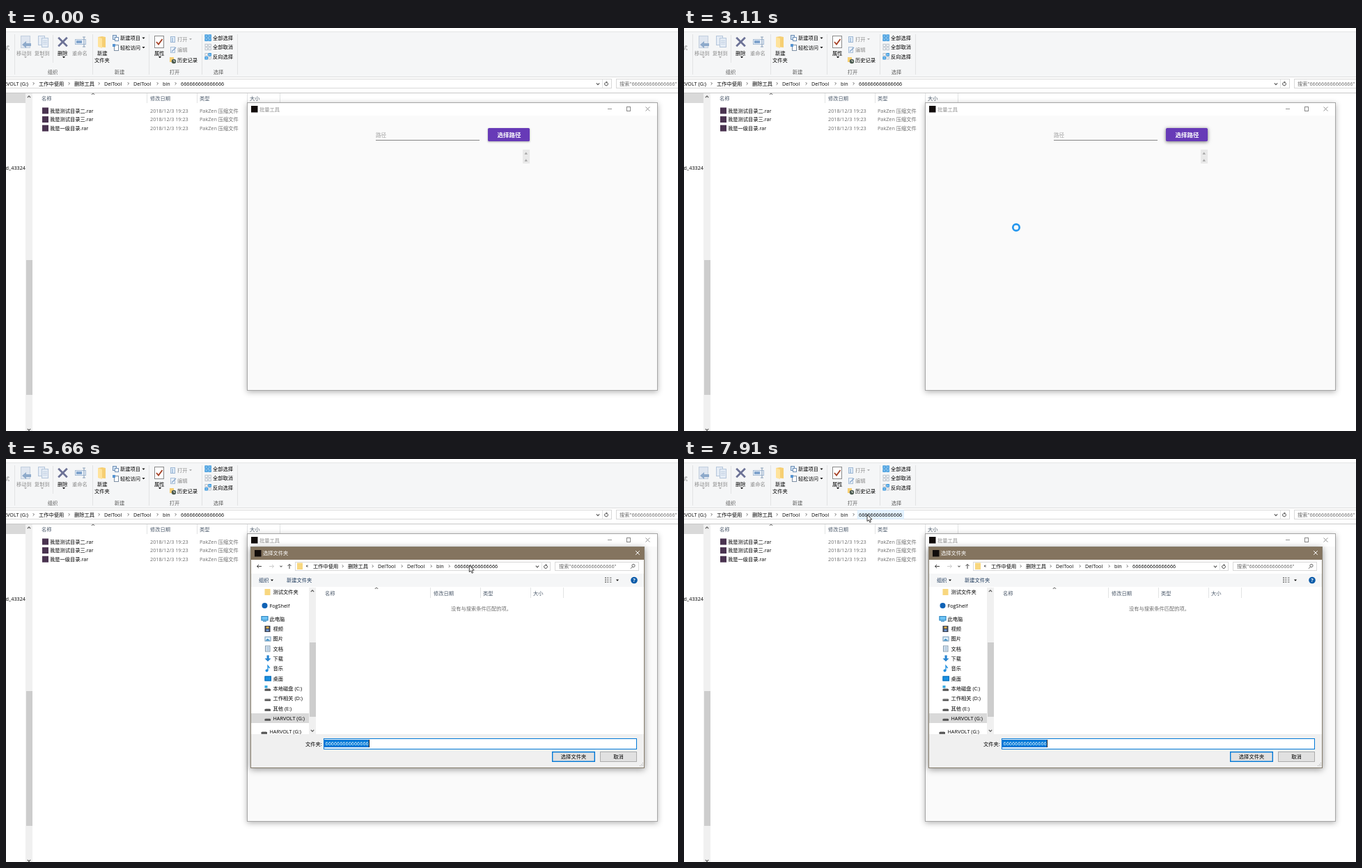
An HTML page with a canvas for the animation above (7.99 s loop, 965x580 px).

```html
<!DOCTYPE html>
<html lang="zh">
<head>
<meta charset="utf-8">
<title>批量工具</title>
<style>
html, body { margin: 0; width: 100%; height: 100%; overflow: hidden; background: #fff }
canvas { display: block }
</style>
</head>
<body>
<canvas id="stage" width="965" height="580"></canvas>
<script>
const c = document.getElementById('stage').getContext('2d');
const LOOP = 7990;
const FONT = '"Open Sans", "Noto Sans CJK SC", "Noto Sans CJK", sans-serif';
const DIGITS = '6'.repeat(15);
const DRIVE = 'HARVOLT (G:)';
const HOVER = '#e5f3ff', BLUE = '#0078d7', GRAY = '#8c8c8c', INK = '#000';

// Pointer keys: time, x, y of the tip
const PATH = [
  [70, 859, 546], [150, 770, 520], [300, 545, 463], [375, 545, 463],
  [830, 330, 300], [1230, 120, 152], [1390, 102, 128], [1690, 102, 128],
  [2160, 430, 238], [2480, 741, 165], [2560, 728, 152], [2640, 720, 149],
  [2800, 720, 149], [3110, 477, 287], [3810, 477, 287], [4430, 690, 180],
  [4660, 666, 153], [4815, 666, 153], [5120, 362, 152], [5350, 668, 152],
  [5660, 666, 153], [6100, 350, 150], [6450, 150, 121], [6690, 236, 84],
  [6830, 232, 80], [6930, 232, 80], [7220, 264, 81], [7840, 264, 81],
  [7910, 263, 80]
];

function pointer(t) {
  const i = PATH.findIndex(k => k[0] > t);
  if (i < 0) return PATH[PATH.length - 1].slice(1);
  if (i === 0) return [-50, -50];
  const [a, x, y] = PATH[i - 1], [b, u, v] = PATH[i];
  const p = (t - a) / (b - a);
  return [x + (u - x) * p, y + (v - y) * p];
}

function rect(x, y, w, h, fill, stroke, line = 1) {
  if (fill) { c.fillStyle = fill; c.fillRect(x, y, w, h); }
  if (stroke) {
    c.strokeStyle = stroke;
    c.lineWidth = line;
    c.strokeRect(x + line / 2, y + line / 2, w - line, h - line);
  }
}

function text(s, x, y, color = INK, size = 7.25, align = 'left', weight = '') {
  c.font = `${weight} ${size}px ${FONT}`;
  c.textAlign = align;
  c.fillStyle = color;
  c.fillText(s, x, y + size * 0.37);
}

function line(color, width, ...p) {
  c.strokeStyle = color;
  c.lineWidth = width;
  c.beginPath();
  for (let i = 0; i < p.length; i += 2) c.lineTo(p[i], p[i + 1]);
  c.stroke();
}

function poly(color, ...p) {
  c.fillStyle = color;
  c.beginPath();
  for (let i = 0; i < p.length; i += 2) c.lineTo(p[i], p[i + 1]);
  c.closePath();
  c.fill();
}

function disc(x, y, r, color) {
  c.fillStyle = color;
  c.beginPath();
  c.arc(x, y, r, 0, 7);
  c.fill();
}

const drop = (x, y, color = INK) => poly(color, x - 2, y - 1, x + 2, y - 1, x, y + 1.2);
const chevron = (x, y, up = 1, color = '#555', w = 2.2) =>
  line(color, 1.1, x - w, y + up, x, y - up, x + w, y + up);
const cross = (x, y, r, color, w = 0.9) => {
  line(color, w, x - r, y - r, x + r, y + r);
  line(color, w, x - r, y + r, x + r, y - r);
};
const vline = (x, y, h, color = '#e2e3e4') => rect(x, y, 1, h, color);

// Shadow outside the box only, so a translucent panel stays clean
function shadow(x, y, w, h, blur, dy, color) {
  c.save();
  c.beginPath();
  c.rect(0, 0, 965, 580);
  c.rect(x, y, w, h);
  c.clip('evenodd');
  c.shadowBlur = blur;
  c.shadowOffsetY = dy;
  c.shadowColor = color;
  rect(x, y, w, h, '#fff');
  c.restore();
}

function page(x, y, w, h, fill = '#fff', edge = '#9fb4cc') {
  rect(x, y, w, h, fill, edge);
}

function refresh(x, y) {
  c.strokeStyle = '#444';
  c.lineWidth = 1;
  c.beginPath();
  c.arc(x, y, 2.4, -0.7, 4.2);
  c.stroke();
  poly('#444', x - 0.5, y - 3.7, x + 2.2, y - 2.6, x - 0.3, y - 0.8);
}

// Path segments: x, label; the one under the pointer lights up
function crumbs(items, y, [mx, my]) {
  for (const [x, label] of items) {
    c.font = `7.25px ${FONT}`;
    const w = c.measureText(label).width;
    if (mx > x - 2 && mx < x + w + 2 && my > y - 7 && my < y + 3.8)
      rect(x - 2, y - 6.5, w + 4.5, 13, HOVER, '#d3eafc', 0.6);
    text(label, x, y);
  }
  for (const [x] of items.slice(1)) {
    line('#555', 0.9, x - 8.3, y - 1.8, x - 6.5, y, x - 8.3, y + 1.8);
  }
}

function headers(xs, y) {
  ['名称', '修改日期', '类型', '大小'].forEach((s, i) => text(s, xs[i], y, '#4c5a6b'));
}

function ribbon() {
  rect(0, 5, 965, 65, '#f5f6f7');
  rect(0, 5, 965, 1, '#e3e4e5');
  rect(0, 70, 965, 1, '#dcddde');
  [12, 124, 205, 281, 332].forEach(x => vline(x, 9, 58));
  vline(67, 10, 40);
  [['组织', 67], ['新建', 163], ['打开', 242], ['选择', 305]]
    .forEach(([s, x]) => text(s, x, 63, '#5c5c5c', 7.25, 'center'));

  text('式', -2, 28, GRAY);
  text('移动到', 15, 36, GRAY);
  text('复制到', 41, 36, GRAY);
  text('删除', 74, 36);
  text('重命名', 95, 36, GRAY);
  text('新建', 131, 36);
  text('文件夹', 127, 46);
  text('属性', 213, 36);
  drop(28, 42, '#aaa'); drop(52, 42, '#aaa'); drop(83, 42); drop(221, 42);

  page(21, 11, 14, 18, '#dfe6f0', '#c3cfde');
  poly('#8eaacb', 23, 24, 29, 19, 29, 22, 36, 22, 36, 26, 29, 26, 29, 29);
  page(46, 11, 10, 14, '#e6edf6', '#b5c6db');
  page(51, 14, 10, 14, '#e6edf6', '#b5c6db');
  [18, 20.5, 23].forEach(y => line('#b5c6db', 0.8, 53, y, 59, y));
  cross(81.5, 20, 6.3, '#6c7296', 2.7);
  rect(99, 16, 16, 8, '#e8eff7', '#a7bdd6');
  rect(101, 18, 8, 4, '#7fa3cc');
  line('#8ba0b8', 1, 110, 13, 114, 13); line('#8ba0b8', 1, 112, 13, 112, 27);
  line('#8ba0b8', 1, 110, 27, 114, 27);
  poly('#f6cf73', 132, 13, 138, 12, 143, 13, 143, 28, 132, 27);
  poly('#ffe39b', 132, 13, 138, 15, 138, 29, 132, 27);
  page(213, 11, 14, 18, '#fff', '#8a8a8a');
  line('#a43e22', 1.8, 216, 20, 219, 23.5, 224.5, 16);

  text('新建项目', 164, 14.5); drop(197.5, 14.5);
  text('轻松访问', 164, 28); drop(197.5, 28);
  page(153, 10, 6, 7, '#d4e4f5', '#6d8fb5'); page(156, 13, 6, 6, '#fff', '#6d8fb5');
  page(155, 24, 7, 9, '#fff', '#7d8fa3'); rect(153, 23, 4, 4, '#5794d2');
  text('打开', 246, 16, GRAY); drop(265, 16, '#aaa');
  text('编辑', 246, 31, GRAY);
  text('历史记录', 246, 46);
  page(236, 12, 7, 9, '#e3edf8', '#9db7d4'); line('#7da2cc', 1, 239, 14, 239, 20);
  page(236, 27, 7, 9, '#eaf1f9', '#a9bfd8'); line('#86a6cb', 1.3, 238, 34, 244, 28);
  rect(235, 42, 6, 7, '#f6cf73');
  disc(241, 48, 3.2, '#4b5a50'); line('#fff', 0.8, 241, 46, 241, 48, 243, 48);

  ['全部选择', '全部取消', '反向选择'].forEach((s, i) => {
    const y = 14.5 + i * 13.25;
    text(s, 297, y);
    for (let k = 0; k < 4; k++) {
      const on = i === 0 || (i === 2 && (k === 1 || k === 2));
      rect(285.5 + k % 2 * 5, y - 5 + (k >> 1) * 5, 4.3, 4.3,
        on ? '#8fcaf5' : '#fff', on ? '#2f8fd6' : '#b4bdc7');
    }
  });
}

function explorer(mouse) {
  const [mx, my] = mouse;
  ribbon();
  rect(-2, 73, 872, 14, '#fff', '#d9d9d9');
  text(DRIVE, 32, 80, INK, 7.25, 'right');
  crumbs([[47, '工作中使用'], [98, '删除工具'], [141, 'DelTool'],
    [183, 'DelTool'], [225, 'bin'], [251, DIGITS]], 80, mouse);
  line('#555', 0.9, 38.7, 78.2, 40.5, 80, 38.7, 81.8);
  chevron(850, 80.5, -1.1);
  vline(856, 74, 12);
  refresh(862, 80.5);
  rect(876, 73, 95, 14, '#fff', '#d9d9d9');
  text(`搜索"${DIGITS}"`, 881, 80, '#666');
  rect(0, 93, 965, 1, '#c8c8c8');

  rect(0, 94, 28, 14, '#d9d9d9');
  text('d_43324', 28, 201, INK, 7.25, 'right');
  rect(28, 94, 10, 486, '#f0f0f0');
  rect(29, 334, 9, 194, '#cdcdcd');
  chevron(33, 99, 1.2); chevron(33, 578, -1.2);

  [202, 274, 346, 393].forEach(x => vline(x, 94, 14));
  headers([51, 207, 278, 350], 101);
  chevron(125, 95, 0.9, '#777');
  ['我是测试目录二', '我是测试目录三', '我是一级目录'].forEach((s, i) => {
    const y = 119 + i * 12.6;
    if (mx > 49 && mx < 347 && Math.abs(my - y) < 6.3) rect(49, y - 6, 298, 12.4, HOVER);
    rect(52, y - 4.5, 9, 9, '#4a3350');
    text(s + '.rar', 63, y);
    text('2018/12/3 19:23', 207, y, '#6d6d6d');
    text('PakZen 压缩文件', 278, y, '#6d6d6d');
  });
}

function tool(t) {
  shadow(346, 107, 590, 415, 8, 1.5, 'rgba(0,0,0,.3)');
  rect(346, 107, 590, 415, '#fafafa');
  rect(347, 108, 588, 18, '#fff');
  rect(346, 107, 590, 415, null, '#a6a6a6');
  rect(352, 112, 9.5, 9.5, '#120d0c');
  text('批量工具', 364, 117, '#8f8f8f');
  line('#888', 0.9, 864, 116.5, 870, 116.5);
  rect(891, 113, 6, 7, null, '#888');
  cross(921.5, 116.5, 3, '#888');

  text('路径', 531, 154, '#a3a3a3', 7.6);
  rect(531, 161, 149, 1, '#858585');
  const hot = t >= 2560 && t < 3960;
  shadow(692, 144, 60, 19, hot ? 5 : 2.5, 1, hot ? 'rgba(0,0,0,.55)' : 'rgba(0,0,0,.32)');
  c.fillStyle = '#673ab7';
  c.beginPath();
  c.roundRect(692, 144, 60, 19, 1.5);
  c.fill();
  text('选择路径', 722.5, 153.5, '#fff', 8.5, 'center', 600);
  rect(742, 175, 10, 20, '#e9e9e9');
  poly('#a9a9a9', 744.5, 182, 749, 182, 746.75, 178.5);
  poly('#a9a9a9', 744.5, 192, 749, 192, 746.75, 188.5);
}

function frameOf(full) {
  shadow(351, 126, 566, 319, 9, 2, 'rgba(0,0,0,.4)');
  rect(351, 126, 566, 319, '#fff');
  rect(351, 126, 566, 19, full ? '#84745f' : '#7e7560');
  rect(357, 131, 9.5, 9.5, '#120d0c');
  text('选择文件夹', 369, 135.5, '#fff');
  cross(907, 135, 2.8, '#fff', 1);
  rect(352, 396, 564, 48, '#f0f0f0');
  rect(351, 126, 566, 319, null, '#857c6c');
  rect(435, 185, 10, 211, '#f0f0f0');
  rect(436, full ? 264 : 195, 9, full ? 107 : 175, '#cdcdcd');
  chevron(440, 190, 1.2); chevron(440, 391, -1.2);
  rect(456, 402, 450, 16, '#fff', BLUE);
}

function skeleton() {
  frameOf(false);
  [[430, 404, 24, 11], [784, 420, 62, 17], [853, 420, 54, 17], [907, 433, 9, 10]]
    .forEach(b => rect(...b, '#fff'));
}

const TREE = [
  ['测试文件夹', 191.5, 1], ['FogShelf', 211, 0], ['此电脑', 230, 0], ['视频', 244, 1],
  ['图片', 258.5, 1], ['文档', 273, 1], ['下载', 287, 1], ['音乐', 301.5, 1],
  ['桌面', 316, 1], ['本地磁盘 (C:)', 330, 1], ['工作相关 (D:)', 344.5, 1],
  ['其他 (E:)', 359, 1], [DRIVE, 373, 1], [DRIVE, 392, 0]
];

function treeIcon(i, x, y) {
  if (i === 0) rect(x, y - 4.5, 8, 9, '#f8d77f');
  else if (i === 1) disc(x + 5, y, 4, '#0f62b5');
  else if (i === 2) {
    rect(x, y - 4, 10, 6.5, '#6fc4f5', '#2d83bd');
    rect(x + 2.5, y + 3.2, 5, 1, '#2d83bd');
  } else if (i === 3) {
    rect(x, y - 4, 8, 9, '#3b4252'); rect(x + 2, y - 3, 4, 3, '#d8a94c');
    rect(x + 2, y + 1, 4, 3, '#6b91c9');
  } else if (i === 4) {
    rect(x, y - 3, 9, 7, '#dff0fb', '#7f9db5'); poly('#3d8fc7', x + 1, y + 3, x + 4, y, x + 8, y + 3);
  } else if (i === 5) {
    page(x + 0.5, y - 4.5, 7.5, 9, '#fff', '#7f98ae');
    [-2, 0, 2].forEach(d => line('#5b91bf', 0.8, x + 2, y + d, x + 6.5, y + d));
  } else if (i === 6) {
    rect(x + 3, y - 4.5, 3.2, 5, '#2a86d1');
    poly('#2a86d1', x, y, x + 9, y, x + 4.5, y + 4.5);
  } else if (i === 7) {
    disc(x + 3, y + 3, 2, '#1d8fe0');
    line('#1d8fe0', 1.3, x + 4.5, y + 3, x + 4.5, y - 4, x + 7.2, y - 0.5);
  } else if (i === 8) rect(x, y - 3.5, 9.5, 7, '#1890e2', '#0b6ab2');
  else {
    rect(x, y + 1, 8.5, 2.8, '#555'); rect(x + 1, y, 6.5, 1, '#b5b5b5');
    if (i === 9) rect(x, y - 4, 4, 3.6, '#36a9e0');
  }
}

function dialog(t, mouse) {
  frameOf(true);
  line('#444', 1, 367, 154.5, 360.5, 154.5); line('#444', 1, 363, 152, 360.5, 154.5, 363, 157);
  line('#ccc', 1, 378, 154.5, 384.5, 154.5); line('#ccc', 1, 382, 152, 384.5, 154.5, 382, 157);
  chevron(395, 154.5, -0.8, '#666', 1.6);
  line('#444', 1, 407, 158, 407, 151.5); line('#444', 1, 404.5, 154, 407, 151.5, 409.5, 154);
  rect(415, 148, 367, 13, '#fff', '#d9d9d9');
  rect(418, 149.5, 8, 9.5, '#f8d77f');
  text('«', 430.5, 153.5);
  crumbs([[441, '工作中使用'], [491, '删除工具'], [534, 'DelTool'],
    [576, 'DelTool'], [618, 'bin'], [644, DIGITS]], 154.2, t < 5640 ? mouse : [0, 0]);
  chevron(763, 154.8, -1.1);
  vline(769, 148, 13);
  refresh(775, 155);
  rect(788, 148, 121, 13, '#fff', '#d9d9d9');
  text(`搜索"${DIGITS}"`, 794, 154.2, '#666');
  c.strokeStyle = '#555';
  c.lineWidth = 0.9;
  c.beginPath();
  c.arc(901, 153.5, 2.1, 0, 7);
  c.stroke();
  line('#555', 1, 899.5, 155.2, 897, 157.7);

  rect(352, 165, 564, 19, '#f5f6f7');
  text('组织', 363, 174.5, '#1e395b'); drop(382, 174.5);
  text('新建文件夹', 403, 174.5, '#1e395b');
  [171, 174, 177].forEach(y => {
    rect(860, y - 0.7, 2, 1.6, '#777');
    rect(863, y - 0.7, 2.5, 1.6, '#999');
    rect(867, y - 0.7, 2.5, 1.6, '#999');
  });
  drop(878, 174.5);
  disc(902, 174.5, 4.8, '#0b5ba9');
  text('?', 902, 174.5, '#fff', 7.5, 'center', 700);

  c.save();
  c.beginPath();
  c.rect(352, 185, 83, 211);
  c.clip();
  rect(352, 366, 84, 14, '#d9d9d9');
  TREE.forEach(([s, y, deep], i) => {
    treeIcon(i, deep ? 371.5 : 366.5, y);
    text(s, deep ? 383.5 : 378.5, y);
  });
  c.restore();

  [609, 681, 753, 800].forEach(x => vline(x, 185, 15));
  headers([458, 614, 685, 757], 193);
  chevron(532, 186, 0.9, '#777');
  text('没有与搜索条件匹配的项。', 639, 215, '#6d6d6d');

  text('文件夹:', 430, 410);
  rect(457, 404, 65, 11, BLUE);
  text(DIGITS, 458.5, 409.7, '#fff');
  if (Math.floor((t - 3990) / 530) % 2) rect(521, 404, 1, 11, '#222');
  rect(784, 421, 62, 15, '#e1e1e1', BLUE, 1.4);
  text('选择文件夹', 815, 428.8, INK, 7.25, 'center');
  rect(853, 421, 53, 15, '#e1e1e1', '#adadad');
  text('取消', 879.5, 428.8, INK, 7.25, 'center');
  for (let i = 0; i < 3; i++)
    for (let k = 0; k <= i; k++) rect(914 - k * 2, 437 + i * 2, 1, 1, '#b0b0b0');
}

function arrow(x, y) {
  c.save();
  c.translate(x, y);
  c.beginPath();
  [[0, 0], [0, 9.6], [2.2, 7.7], [3.9, 11.3], [5.4, 10.6], [3.9, 7.2], [6.9, 7]]
    .forEach(p => c.lineTo(...p));
  c.closePath();
  c.fillStyle = '#fff';
  c.fill();
  c.strokeStyle = '#111';
  c.lineWidth = 0.8;
  c.stroke();
  c.restore();
}

function busy(x, y) {
  c.strokeStyle = '#2497ee';
  c.lineWidth = 2.7;
  c.beginPath();
  c.arc(x, y, 4.7, 0, 7);
  c.stroke();
}

function draw(t) {
  const mouse = pointer(t);
  c.fillStyle = '#fff';
  c.fillRect(0, 0, 965, 580);
  explorer(mouse);
  tool(t);
  if (t >= 3960) dialog(t, mouse);
  else if (t >= 3640) {
    const p = Math.min(1, (t - 3640) / 240);
    const scale = 0.98 + 0.02 * Math.sqrt(p);
    c.save();
    c.globalAlpha = Math.min(1, 0.4 + 0.72 * p);
    c.translate(634.5, 285);
    c.scale(scale, scale);
    c.translate(-634.5, -285);
    skeleton();
    c.restore();
  }
  (t >= 3030 && t < 3720 ? busy : arrow)(...mouse);
}

function tick() {
  draw(performance.now() % LOOP);
  requestAnimationFrame(tick);
}
tick();
</script>
</body>
</html>
```
